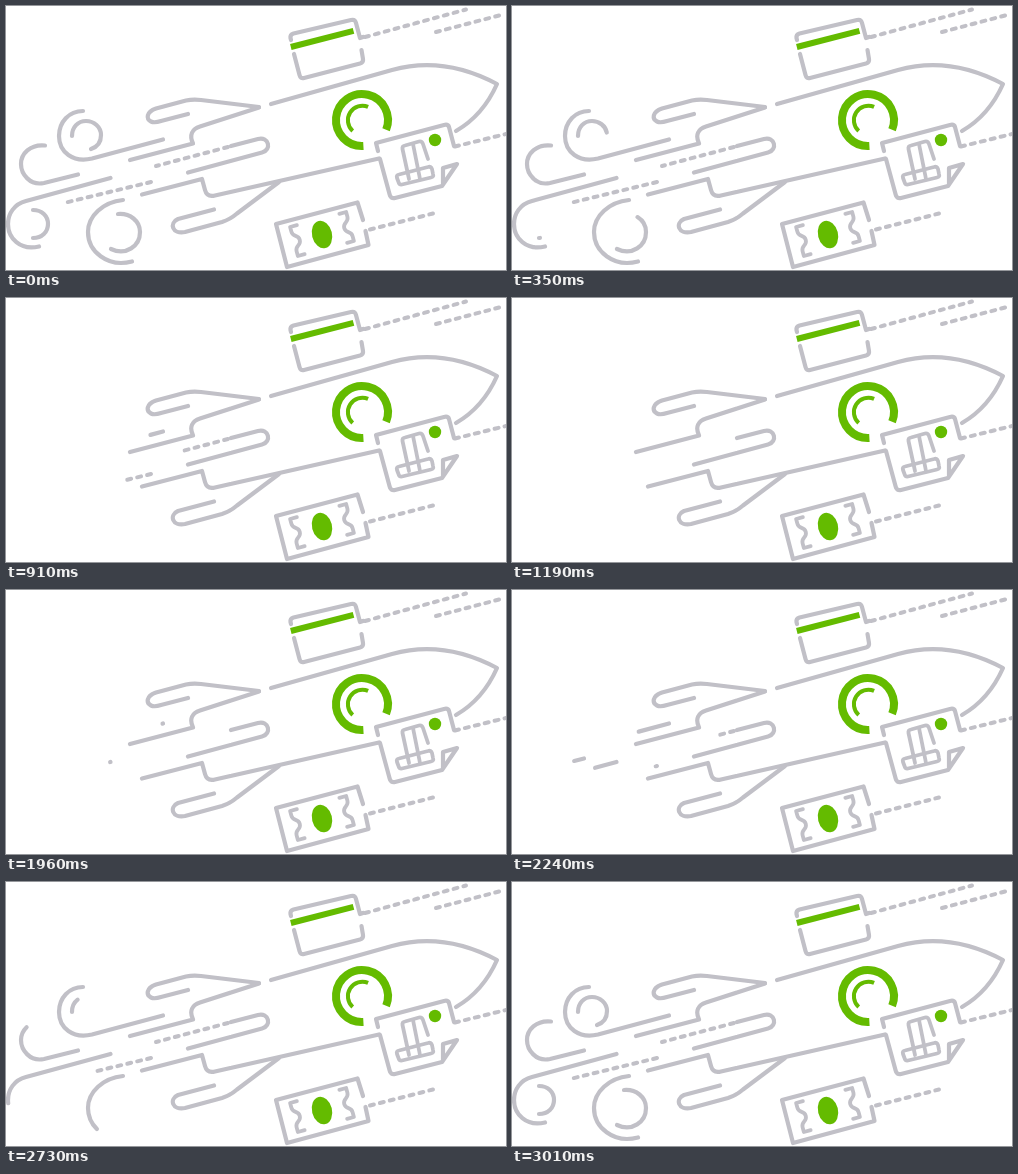
An HTML page that plays this animation: 500 by 264 pixels, repeating every 5.81 s.

```html
<!DOCTYPE html>
<html lang="en">
<head>
<meta charset="utf-8">
<title>Rocket</title>
<style>
  html, body { margin: 0; width: 100%; height: 100%; overflow: hidden; background: #fff; }
  svg { display: block; width: 100%; height: 100%; }
  .line { fill: none; stroke: #c1c0c7; stroke-width: 4.2; stroke-linecap: round; stroke-linejoin: round; }
  .thin { stroke-width: 3.8; }
  .dash { stroke-width: 4; stroke-dasharray: 4 6.2; }
  .green { fill: #64bb00; }
  .ring { fill: none; stroke: #64bb00; }
</style>
</head>
<body>
<svg viewBox="0 0 500 264">
  <g class="line">
    <!-- hull -->
    <path d="M265 98 L386 64 C425 53 461 62 491 78 C483 96 469 114 450 125"/>
    <path d="M136 188.500 L196 173 L199 184 Q201 191.500 209 189.500 L373 152.500"/>
    <path d="M124 154 L187 137.500 C183 129 186 123 194 120.500 L253 101.500"/>
    <path d="M253 101 L195 94 Q187 93 180 94.500 L150 102.500 C140 106 140 113 145 115.500 C148 117 152 116 155 115 L182 108"/>
    <path d="M273 176 L231 207.500 Q224 213.500 216 216 L179 226 C166 228.500 163 217 172 213 L208 203.500"/>
    <path d="M225 140 L252 133 C263 130 266 144 256 146.500 L182 166.500"/>

    <!-- payment card -->
    <path d="M285 34 L284.500 32 Q284 28.500 287.500 27.500 L345 14 Q349 13 350 17 L354 32 L357 31"/>
    <path d="M288 48 L293.500 69 Q294.500 73 298 72 L354 57.500 Q357.500 56.500 357 53 L355.500 44"/>

    <!-- document -->
    <path d="M372 145 L370 137 L438 119 Q442 118 443 121 L448 140"/>
    <path d="M374 153 L383.500 188 Q384.500 193 389 192 L436 180 L451 158 L437 162 L437 178"/>
    <g class="thin">
      <path d="M403 173 L396.500 143 Q396 140 399 139.500 L413 135.500 Q416 135 417 138 L422 153"/>
      <path d="M407 138 L414 173"/>
      <path d="M393 168.500 L422 161 Q425 160 426 163 L427 168 Q428 171 425 171.500 L396 178.500 Q393 179 392.500 176 L391 172 Q390 169 393 168.500 Z"/>
    </g>

    <!-- banknote -->
    <path d="M357 214 L351.500 196.500 L270 218 L281 261 L362.500 239 L359.500 225"/>
    <g class="thin" transform="translate(316 228) rotate(-15)">
      <path id="bracket" d="M-22 -15 H-29 V-10 Q-29 -7 -26 -5 Q-23 -3 -23 0 Q-23 3 -26 5 Q-29 7 -29 10 V15 H-22"/>
      <use href="#bracket" transform="scale(-1 1)"/>
    </g>

    <g class="dash">
      <path d="M359 31 L460 3.500"/>
      <path d="M430 26 L495 9"/>
      <path d="M449 140.500 L500 128"/>
      <path d="M364 223.500 L427 207.500"/>
    </g>
    <g id="trails"></g>
  </g>

  <path class="ring" stroke-width="6" d="M284.800 41 L347.500 24.800"/>
  <path class="ring" stroke-width="8" d="M380.100 123.700 A26 26 0 1 0 357.400 140"/>
  <path class="ring" stroke-width="4" d="M362.100 100.900 A14.500 14.500 0 0 0 346.700 125"/>
  <circle class="green" cx="429" cy="134" r="6.200"/>
  <ellipse class="green" cx="316" cy="228.500" rx="10" ry="14" transform="rotate(-14 316 228.500)"/>
</svg>
<script>
const LOOP = 5810, STEP = 70;
const host = document.getElementById('trails');

// Each trail runs from the rocket outwards; erase and draw are time windows in ms.
const trails = [
  { erase: [0, 933], draw: [1930, 2852], paths: [
    'M157 133.500 L86 152.500 C67 157 53 146 53 130 C53 116 63 105 77 105',
    'M66 130 C66 121 72 115 80 115 C88 115 95 121 95 129 C95 136 91 141 85 143'] },
  { erase: [0, 664], draw: [1930, 3010], paths: [
    'M104.500 172 L20 195 C8 198 2 208 2 218 C2 232 14 245 33 240.500',
    'M27 232 C36 232 42 226 42 218 C42 210 36 204 27 204'] },
  { erase: [500, 850], draw: [2020, 2820], paths: [
    'M72 168.500 L38 177 C24 180 15 168 15 158 C15 148 24 138 39 139.500'] },
  { erase: [60, 905], draw: [2308, 3005], paths: [
    'M117 194 C97 196 82 210 82 226 C82 245 101 262 126 255.500',
    'M105 243 C120 250 134 240 134 226 C134 215 124 207 112 208'] },
  { erase: [500, 990], draw: [2170, 2870], dashed: true, paths: ['M145 176 L60 196.500'] },
  { erase: [500, 1150], draw: [2000, 2500], dashed: true, paths: ['M222 141 L150 160'] }
];

for (const trail of trails) {
  trail.parts = trail.paths.map(d => {
    const node = document.createElementNS('http://www.w3.org/2000/svg', 'path');
    node.setAttribute('d', d);
    if (trail.dashed) node.setAttribute('class', 'dash');
    host.append(node);
    const length = node.getTotalLength();
    return { node, length, start: node.getPointAtLength(0), end: node.getPointAtLength(length) };
  });
  trail.length = trail.parts.reduce((sum, part) => sum + part.length, 0);
}

function easeIn(time, [from, to], power) {
  const u = Math.min(1, Math.max(0, (time - from) / (to - from)));
  return u ** power;
}

function showPart({ node, length, start, end }, visible, dashed) {
  node.style.display = visible > 0 ? '' : 'none';
  if (dashed) {
    const share = Math.min(1, visible / length);
    const x = start.x + (end.x - start.x) * share;
    const y = start.y + (end.y - start.y) * share;
    node.setAttribute('d', `M${start.x} ${start.y} L${x} ${y}`);
  } else {
    node.style.strokeDasharray = visible < length ? `${Math.max(visible, 0.01)} 999` : 'none';
  }
}

function render(now) {
  const time = Math.floor((now % LOOP) / STEP) * STEP;
  for (const trail of trails) {
    const shown = time < 1500
      ? 1 - easeIn(time, trail.erase, 2.4)
      : easeIn(time, trail.draw, 1.8);
    let left = shown * trail.length + (shown === 1 ? 1 : 0);
    for (const part of trail.parts) {
      showPart(part, left, trail.dashed);
      left -= part.length;
    }
  }
}

const origin = performance.now();
function tick() {
  render(performance.now() - origin);
  requestAnimationFrame(tick);
}
tick();
</script>
</body>
</html>
```
